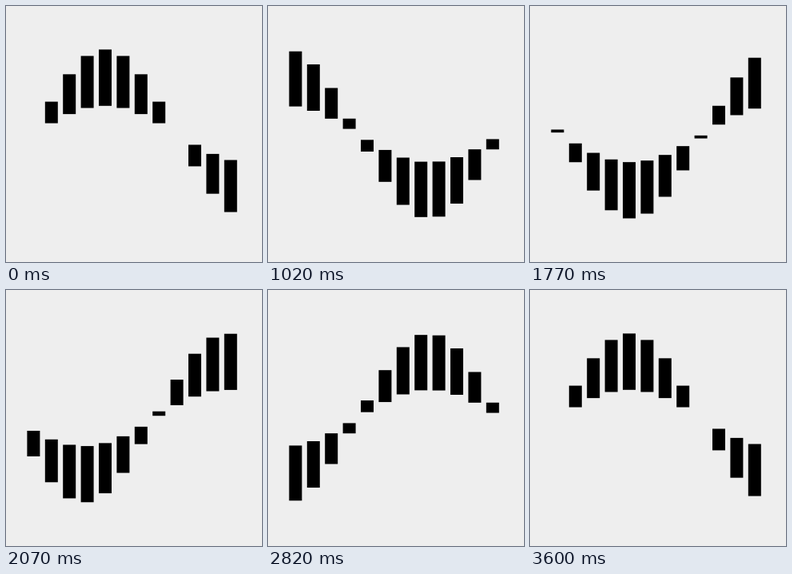
Animation of 320x320 px, one loop 3630 ms. Source, as an HTML page:

```html
<!DOCTYPE html>
<html lang="en">
<head>
<meta charset="utf-8">
<title>Sine bars</title>
<style>
  html, body { margin: 0; width: 100%; height: 100%; overflow: hidden; background: #eee; }
  svg { display: block; width: 100vw; height: 100vh; }
</style>
</head>
<body>
<svg id="stage" viewBox="0 0 320 320"></svg>
<script>
  const COUNT = 12, LEFT = 26.4, PITCH = 22.4, WIDTH = 16;
  const MID = 160, AMP = 70.4;
  const STEP_MS = 30, STEPS = 121; // the last step repeats the first pose
  const stage = document.getElementById('stage');

  const bars = Array.from({ length: COUNT }, (_, i) => {
    const bar = document.createElementNS('http://www.w3.org/2000/svg', 'rect');
    bar.setAttribute('x', (LEFT + i * PITCH).toFixed(1));
    bar.setAttribute('width', WIDTH);
    return stage.appendChild(bar);
  });

  // Each bar is centred on the wave and as tall as its distance from the axis.
  function draw(now) {
    const step = Math.floor(now / STEP_MS) % STEPS;
    const phase = step * 2 * Math.PI / (STEPS - 1);
    bars.forEach((bar, i) => {
      const offset = AMP * Math.sin(phase + i * Math.PI / 8);
      const height = Math.abs(offset);
      bar.setAttribute('y', (MID - offset - height / 2).toFixed(3));
      bar.setAttribute('height', height.toFixed(3));
    });
  }

  function tick() {
    draw(performance.now());
    requestAnimationFrame(tick);
  }
  tick();
</script>
</body>
</html>
```
